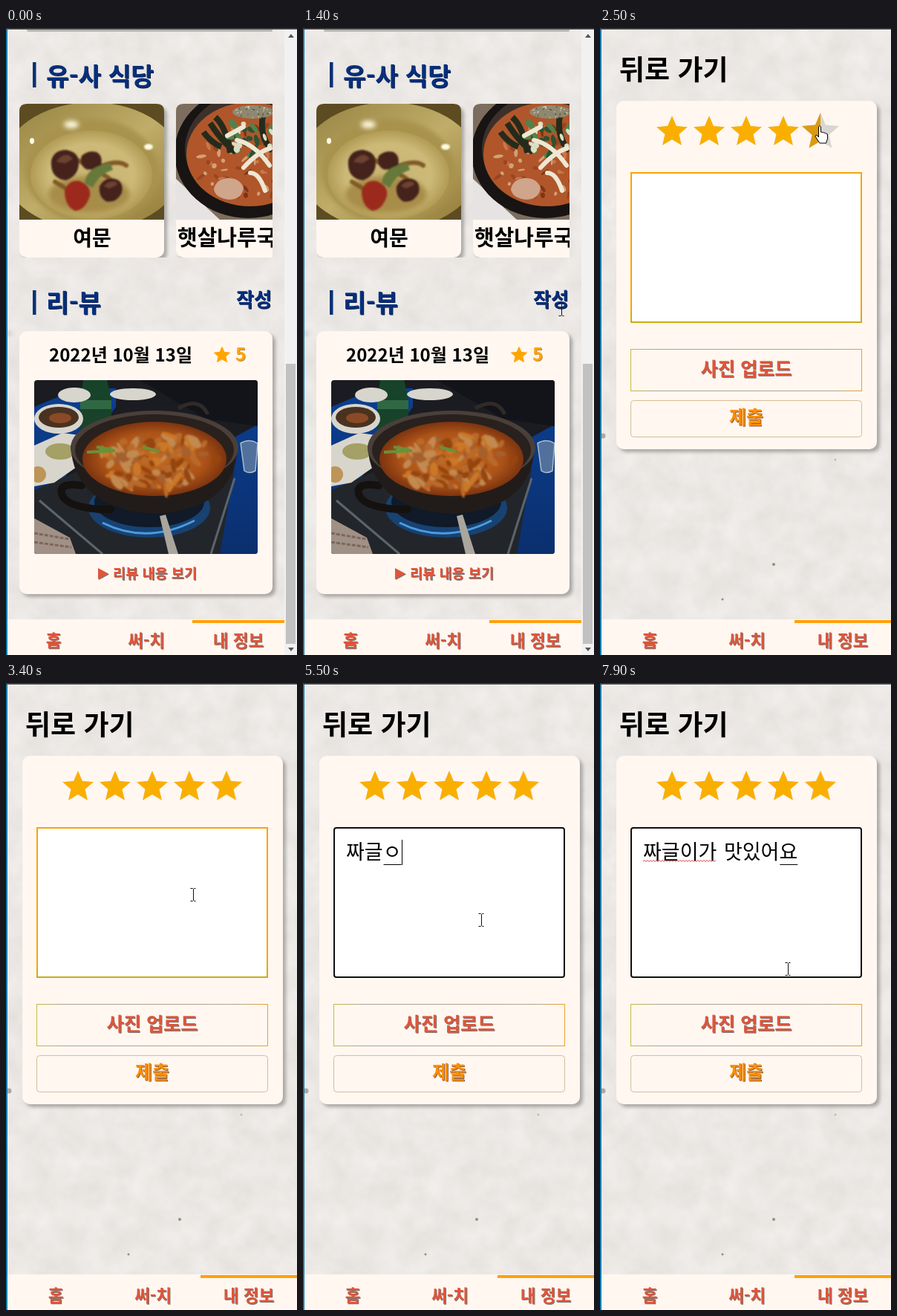
Animation, 392 px wide and 844 px high, one loop 8 s. Source, as an HTML page:

```html
<!DOCTYPE html>
<html lang="ko">
<head>
<meta charset="utf-8">
<title>리뷰 작성</title>
<style>
html, body { margin: 0; width: 100%; height: 100%; overflow: hidden; background: #e9e6e3; }
svg { display: block; }
text { font-family: "Noto Sans CJK KR", "Noto Sans CJK", "Noto Sans KR", sans-serif; font-weight: 700; white-space: pre; }
.mid { text-anchor: middle; }
.heavy { font-weight: 900; }
.cream { fill: #fff7f0; }
.lift { filter: drop-shadow(4px 4px 2px #0004); }
.head { font-size: 33.5px; font-weight: 900; fill: #062f7c; filter: drop-shadow(1px 1px 0 #0a1f4c); }
.red { fill: #e0553a; filter: drop-shadow(1px 1px 0 #777); }
.orange { fill: #ff9000; filter: drop-shadow(1px 1px 0 #8a5a48); }
.nav { font-size: 22.5px; text-anchor: middle; }
.gold { fill: #faaf00; }

/* 100 ms is 1.25% of the loop */
.first, .second, .arrow, .beam, .hand, .cursor, .focus, .four, .fifth, .half, .full {
  animation: 8s step-end infinite;
}
.first { animation-name: first; }
.second { animation-name: second; }
.cursor { animation-name: move; }
.arrow { animation-name: arrow; }
.beam { animation-name: beam; }
.hand { animation-name: hand; }
.focus { animation-name: focus; }
.four, .half { animation-name: four; }
.half { animation-name: half; }
.full { animation-name: full; }
.fifth { animation-name: hover; transform-origin: 297px 139px; }
@keyframes first { 0% { opacity: 1 } 18.75% { opacity: 0 } }
@keyframes second { 0% { opacity: 0 } 18.75% { opacity: 1 } }
@keyframes focus { 0% { opacity: 0 } 45% { opacity: 1 } }
@keyframes four { 0% { opacity: 0 } 27.5% { opacity: 1 } }
@keyframes half { 0% { opacity: 0 } 27.5% { opacity: 1 } 33.75% { opacity: 0 } }
@keyframes full { 0% { opacity: 0 } 33.75% { opacity: 1 } }
@keyframes hover { 0% { transform: scale(1) } 27.5% { transform: scale(1.2) } 37.5% { transform: scale(1) } }
@keyframes arrow { 0% { opacity: 0 } 3.75% { opacity: 1 } 8.75% { opacity: 0 } }
@keyframes beam { 0% { opacity: 0 } 8.75% { opacity: 1 } 27.5% { opacity: 0 } 41.25% { opacity: 1 } }
@keyframes hand { 0% { opacity: 0 } 27.5% { opacity: 1 } 41.25% { opacity: 0 } }
@keyframes move {
  0% { transform: translate(235px, 640px) }
  5% { transform: translate(290px, 540px) }
  6.25% { transform: translate(335px, 450px) }
  7.5% { transform: translate(356px, 390px) }
  8.75% { transform: translate(348px, 379px) }
  23.75% { transform: translate(307px, 340px) }
  26.25% { transform: translate(298px, 220px) }
  27.5% { transform: translate(297px, 146px) }
  30% { transform: translate(296px, 133px) }
  33.75% { transform: translate(302px, 133px) }
  38.75% { transform: translate(296px, 146px) }
  41.25% { transform: translate(272px, 230px) }
  42.5% { transform: translate(252px, 285px) }
  43.75% { transform: translate(238px, 315px) }
  48.75% { transform: translate(240px, 319px) }
  96.25% { transform: translate(243px, 335px) }
  97.5% { transform: translate(249px, 365px) }
  98.75% { transform: translate(253px, 385px) }
}
</style>
</head>
<body>
<svg width="392" height="844" viewBox="0 0 392 844">
  <defs>
    <filter id="paper" x="0" y="0" width="1" height="1" color-interpolation-filters="sRGB">
      <feTurbulence type="fractalNoise" baseFrequency=".03" numOctaves="5" seed="7"/>
      <feColorMatrix values=".07 0 0 0 .885  .072 0 0 0 .872  .075 0 0 0 .858  0 0 0 0 1"/>
    </filter>
    <filter id="soft" x="-1" y="-1" width="3" height="3"><feGaussianBlur stdDeviation="3"/></filter>
    <filter id="blend"><feGaussianBlur stdDeviation="1"/></filter>
    <path id="star" d="M12 17.27 18.18 21l-1.64-7.03L22 9.24l-7.19-.61L12 2 9.19 8.63 2 9.24l5.46 4.73L5.82 21z"/>
    <path id="halfStar" d="M12 2 9.19 8.63 2 9.24l5.46 4.73L5.82 21 12 17.27z"/>
    <clipPath id="row"><rect x="18" y="90" width="341" height="219"/></clipPath>
    <clipPath id="dish"><path d="M18 258V112q0-10 10-10H203q10 0 10 10V258z"/></clipPath>
    <clipPath id="bowl"><path d="M229 258V112q0-10 10-10H359V258z"/></clipPath>
    <clipPath id="photo"><rect x="38" y="474" width="301" height="234" rx="4"/></clipPath>
    <linearGradient id="plate" x2="1" y2="1">
      <stop stop-color="#93803f"/><stop offset=".5" stop-color="#c0ad69"/><stop offset="1" stop-color="#8d7433"/>
    </linearGradient>
    <radialGradient id="well">
      <stop stop-color="#c9b473"/><stop offset=".7" stop-color="#cdba78"/><stop offset="1" stop-color="#b19b55"/>
    </radialGradient>
    <radialGradient id="soup">
      <stop stop-color="#c26b24"/><stop offset=".7" stop-color="#ad5318"/><stop offset="1" stop-color="#7d340f"/>
    </radialGradient>
    <linearGradient id="cloth" x2="0" y2="1">
      <stop stop-color="#0b3f91"/><stop offset="1" stop-color="#0b2f6e"/>
    </linearGradient>
    <linearGradient id="edge" x2="1">
      <stop stop-color="#c8b83c"/><stop offset=".12" stop-color="#a9a49b"/>
      <stop offset=".88" stop-color="#b3a48d"/><stop offset="1" stop-color="#eda02a"/>
    </linearGradient>
    <linearGradient id="field" x2="0" y2="1">
      <stop offset=".9" stop-color="#f5a50c"/><stop offset="1" stop-color="#c9ad16"/>
    </linearGradient>
  </defs>

  <rect width="392" height="844" filter="url(#paper)"/>

  <g class="first">
    <circle cx="4" cy="411" r="3" fill="#b9afa6" filter="url(#soft)"/>
    <rect x="28" y="1" width="331" height="4" rx="2" fill="#b9b6b3"/>
    <path d="M36 46h4.500v34h-4.500zM36 353h4.500v33h-4.500z" fill="#0b3177"/>
    <text class="head" x="54" y="77">유-사 식당</text>
    <text class="head" x="54" y="382">리-뷰</text>
    <text class="head" x="310" y="375" style="font-size:26px">작성</text>

    <g clip-path="url(#row)">
      <rect class="cream lift" x="18" y="102" width="195" height="207" rx="10"/>
      <rect class="cream lift" x="229" y="102" width="195" height="207" rx="10"/>
      <text class="mid heavy" x="116" y="293" font-size="28">여문</text>
      <text class="heavy" x="231" y="293" font-size="29">햇살나루국밥</text>
    </g>

    <g clip-path="url(#dish)">
      <rect x="18" y="102" width="195" height="156" fill="#5d4c22"/>
      <ellipse cx="116" cy="186" rx="122" ry="86" fill="url(#plate)"/>
      <ellipse cx="115" cy="192" rx="90" ry="70" fill="#a8934e" filter="url(#soft)"/>
      <ellipse cx="115" cy="198" rx="82" ry="60" fill="url(#well)"/>
      <ellipse cx="112" cy="224" rx="55" ry="25" fill="#a88d48" filter="url(#soft)"/>
      <g fill="#fffbe2"><ellipse cx="88" cy="130" rx="10" ry="5" filter="url(#soft)"/><ellipse cx="192" cy="160" rx="6" ry="4" filter="url(#blend)"/><ellipse cx="35" cy="152" rx="3" ry="4"/></g>
      <g filter="url(#blend)">
        <g fill="none" stroke="#805a28" stroke-width="6" stroke-linecap="round"><path d="M84 174q20 5 26 14M128 186q23-9 34-1M124 195q20 6 22 20M66 207l18 11"/></g>
        <g fill="#44241a"><path d="M61 178q4-14 20-14 17 3 17 17 0 18-17 24-22-2-20-27zM102 172q9-8 20-5 9 5 6 18-8 9-22 4-8-7-4-17zM126 213q7-13 20-10 13 3 10 19-8 15-22 11-10-7-8-20z"/></g>
        <path d="M68 180q6-10 16-9l6 5-10 6zM132 213q6-8 16-6l2 4-11 5z" fill="#6d4230"/>
        <path d="M79 219q5-15 20-13 16 6 14 20-6 19-20 20-14-6-14-27z" fill="#9b2a1c"/>
        <path d="M106 209q2-23 35-27l3 9q-19 6-27 24z" fill="#66793a"/>
      </g>
    </g>

    <g clip-path="url(#bowl)">
      <rect x="229" y="102" width="130" height="156" fill="#7d6d5e"/>
      <path d="M229 203L288 258H229z" fill="#e6e3e2"/>
      <ellipse cx="326" cy="168" rx="99" ry="88" fill="#171413"/>
      <ellipse cx="329" cy="163" rx="88" ry="76" fill="#3d302a"/>
      <ellipse cx="329" cy="170" rx="86" ry="70" fill="#b0562a"/>
      <g id="stew"></g>
      <path d="M275 128q18 28 35 39M282 120q15 14 20 48M346 118q-5 30 13 47M266 140q10 14 24 20" stroke="#252b1c" stroke-width="8" fill="none"/>
      <g id="greens"></g>
      <path d="M311 151q24 5 44 34M320 188q20-22 36-26M329 195q12 0 20 24M298 145l22-12" stroke="#eee7d3" stroke-width="6" fill="none" stroke-linecap="round"/>
      <path d="M280 217q3-14 19-15 16 0 21 13-2 16-20 16-18-2-20-14z" fill="#cfa58b"/>
      <ellipse cx="333" cy="113" rx="28" ry="9" fill="#8f8871"/>
      <g id="sesame"></g>
    </g>

    <rect class="cream lift" x="18" y="408" width="341" height="354" rx="10"/>
    <text x="58" y="449" font-size="24">2022년 10월 13일</text>
    <use href="#star" x="279" y="428" fill="#ffa500" stroke="#ffa500" stroke-width="1.6" stroke-linejoin="round"/>
    <text x="309" y="448" font-size="24" fill="#ffa500" style="filter:drop-shadow(1px 1px 0 #b98a50)">5</text>

    <g clip-path="url(#photo)">
      <rect x="38" y="474" width="301" height="234" fill="#1b1c21"/>
      <path d="M38 510l60-25 50 0v25L75 610l-37 20zM300 555l39-21v174h-60z" fill="url(#cloth)"/>
      <path d="M180 474h159v62l-70-10z" fill="#131419"/>
      <path d="M38 622l70-30 200 0-20 116H38z" fill="#22262b"/>
      <path d="M45 636l85 72M276 708l32-102" stroke="#5c646b" stroke-width="3"/>
      <path d="M38 660l48 26 8 22H38z" fill="#a09186"/>
      <path d="M38 680l47 8M38 692l50 7" stroke="#80645a" stroke-width="3" stroke-dasharray="5 2"/>
      <path d="M104 474h32l6 25v42h-42v-42z" fill="#17432a"/>
      <path d="M100 501h42v12h-42z" fill="#2f6843"/>
      <g fill="#d8d5cd"><ellipse cx="92" cy="494" rx="22" ry="10"/><ellipse cx="171" cy="493" rx="31" ry="8"/><ellipse cx="71" cy="526" rx="33" ry="20"/><path d="M38 562l38-17 22 3 7 36-40 28-27 5z"/></g>
      <ellipse cx="71" cy="524" rx="27" ry="14" fill="#493220"/>
      <ellipse cx="73" cy="525" rx="15" ry="7" fill="#8a4a25"/>
      <ellipse cx="73" cy="570" rx="20" ry="11" fill="#a4a066"/>
      <ellipse cx="43" cy="601" rx="11" ry="11" fill="#bd9558"/>
      <path d="M316 559q11-7 23 0l-3 37q-8 5-15 0z" fill="#51719c" stroke="#a9bdd0" stroke-width="1.5"/>
      <ellipse cx="193" cy="646" rx="82" ry="40" fill="#174272"/>
      <ellipse cx="193" cy="638" rx="74" ry="34" fill="#101a28"/>
      <path d="M130 666q60 30 124-3" stroke="#4c9be0" stroke-width="3" fill="none"/>
      <path d="M207 657l8-2 17 53h-13z" fill="#aaa69d"/>
      <path d="M102 616q-31-5-27 11 4 17 52 21l14 0" stroke="#14110f" stroke-width="10" fill="none" stroke-linecap="round"/>
      <path d="M232 512q28-16 40 8" stroke="#302a28" stroke-width="5" fill="none"/>
      <path d="M87 562q5 85 112 92 110-5 113-92z" fill="#211c1a"/>
      <ellipse cx="200" cy="565" rx="113" ry="50" fill="#4a3f39"/>
      <ellipse cx="200" cy="568" rx="107" ry="48" fill="#29211d"/>
      <ellipse cx="200" cy="580" rx="97" ry="50" fill="url(#soup)"/>
      <g id="stewBig" filter="url(#blend)"></g>
      <path d="M109 571l38-2M184 564l22 6M122 564l22 4" stroke="#69913a" stroke-width="4"/>
    </g>
    <path class="red" d="M124 727l14 7.5-14 7.5z"/>
    <text class="red" x="144" y="741" font-size="18.6">리뷰 내용 보기</text>

    <rect class="cream" x="2" y="796" width="373" height="48"/>
    <rect x="251" y="797" width="124" height="4" fill="#ffa10a"/>
    <text class="nav red" x="64" y="833">홈</text>
    <text class="nav red" x="189" y="833">써-치</text>
    <text class="nav red" x="313" y="833">내 정보</text>
    <rect x="375" width="17" height="844" fill="#f1f1f1"/>
    <rect x="377" y="452" width="13" height="377" fill="#c1c1c1"/>
    <path d="M380 13l4-5 4 5zM380 834l4 5 4-5z" fill="#555"/>
  </g>

  <g class="second">
    <g fill="#978c82"><circle cx="4" cy="549" r="3.5" opacity=".7"/><circle cx="234" cy="722" r="2"/><circle cx="165" cy="769" r="1.5"/><circle cx="317" cy="581" r="1.5" opacity=".5"/></g>
    <text class="heavy" x="26" y="70" font-size="37">뒤로 가기</text>
    <rect class="cream lift" x="22" y="98" width="351" height="469" rx="10"/>
    <g id="emptyStars" fill="#d8d5d2"></g>
    <g id="goldStars" class="four gold"></g>
    <g class="fifth">
      <g transform="translate(272 114) scale(2.083)">
        <use href="#star" fill="#d8d5d2"/>
        <use class="half" href="#halfStar" fill="#dc9a10"/>
        <use class="full gold" href="#star"/>
      </g>
    </g>
    <rect x="42" y="195" width="310" height="201" fill="#fff" stroke="url(#field)" stroke-width="2"/>
    <g class="focus">
      <rect x="41" y="194" width="312" height="203" fill="#fff7f0"/>
      <rect x="42" y="195" width="310" height="201" rx="3" fill="#fff" stroke="#101010" stroke-width="2"/>
    </g>
    <path id="squiggle" fill="none" stroke="#d33" stroke-width="1"/>
    <text id="typed" x="58" y="237" style="font-size:27px;font-weight:500;word-spacing:2px"></text>
    <rect id="underline" y="244" height="1"/>
    <rect id="caret" y="211" width="1" height="34"/>
    <rect x="41.5" y="432.5" width="311" height="56" fill="none" stroke="url(#edge)"/>
    <text class="mid red" x="197" y="468" font-size="25.2">사진 업로드</text>
    <rect x="41.5" y="501.5" width="311" height="49" rx="4" fill="none" stroke="#d6bd9a"/>
    <text class="mid orange" x="197" y="533" font-size="25">제출</text>
    <rect class="cream" x="2" y="796" width="390" height="48"/>
    <rect x="262" y="797" width="130" height="4" fill="#ffa10a"/>
    <text class="nav red" x="67" y="833">홈</text>
    <text class="nav red" x="198" y="833">써-치</text>
    <text class="nav red" x="327" y="833">내 정보</text>
  </g>

  <rect width="2" height="844" fill="#1680b3"/>
  <rect width="392" height="2" fill="#414144"/>

  <g class="cursor">
    <path class="arrow" d="M0 0v16l4-4 3 7 2-1-3-7h6z" fill="#fff" stroke="#000"/>
    <path class="beam" d="M-3.5-8.5h3l1 1 1-1h2M.5-7.5v15M-3.5 8.5h3l1-1 1 1h2" fill="none" stroke="#111"/>
    <path class="hand" d="M-1.5 0q1.5-3 3 0v7l3 .5 3 1 3 1.5v6l-2 6H0l-6-9q0-3 3-1l1.500 2z" fill="#fff" stroke="#000" stroke-linejoin="round"/>
  </g>
</svg>
<script>
const $ = id => document.getElementById(id);
const NS = 'http://www.w3.org/2000/svg';

function add(parent, tag, attrs) {
  const el = document.createElementNS(NS, tag);
  for (const key in attrs) el.setAttribute(key, attrs[key]);
  parent.append(el);
}

let seed = 11;
const random = () => (seed = seed * 16807 % 2147483647) / 2147483647;

// Scatters small pieces of food inside an ellipse.
function scatter(id, count, cx, cy, rx, ry, size, colors) {
  for (let i = 0; i < count; i++) {
    const angle = random() * 2 * Math.PI, reach = Math.sqrt(random());
    const x = cx + rx * reach * Math.cos(angle), y = cy + ry * reach * Math.sin(angle);
    add($(id), 'ellipse', {
      rx: size * (.4 + random()), ry: size * (.25 + random() * .4),
      fill: colors[i % colors.length],
      transform: `translate(${x} ${y}) rotate(${random() * 180})`
    });
  }
}
scatter('stew', 80, 328, 180, 74, 52, 5, ['#c9784a', '#9a4422', '#d3a077', '#7d3419']);
scatter('greens', 24, 328, 145, 32, 28, 7, ['#55804a', '#d9e0c4', '#2f5130']);
scatter('sesame', 30, 334, 113, 26, 8, 1.5, ['#e3d9bb', '#5b5340']);
scatter('stewBig', 110, 202, 583, 82, 38, 9, ['#b96b2a', '#96440f', '#c28a50', '#a4602f', '#cb7828']);

for (let i = 0; i < 4; i++) {
  const transform = `translate(${72 + 50 * i} 114) scale(2.083)`;
  for (const row of ['emptyStars', 'goldStars']) add($(row), 'use', { href: '#star', transform });
}

let wave = 'M58 240';
for (let x = 60, up = true; x <= 157; x += 2, up = !up) wave += `L${x} ${up ? 238.5 : 240.5}`;
$('squiggle').setAttribute('d', wave);

const LOOP = 8000, LEFT = 58;
const typing = [
  [0, ''], [4500, 'ㅉ'], [5100, '짜'], [5200, '짝'], [5300, '짜그'], [5400, '짜글'],
  [5500, '짜글ㅇ'], [5600, '짜글이'], [5700, '짜글익'], [5800, '짜글이가'], [5900, '짜글이가 '],
  [6100, '짜글이가 마'], [6200, '짜글이가 맛'], [6300, '짜글이가 맛ㅇ'], [6400, '짜글이가 맛이'],
  [6500, '짜글이가 맛있'], [6600, '짜글이가 맛있ㅇ'], [6700, '짜글이가 맛있어'],
  [6800, '짜글이가 맛있엉'], [6900, '짜글이가 맛있어요']
];

function draw(now) {
  const clock = document.timeline.currentTime ?? now;
  const start = document.getAnimations()[0]?.startTime ?? 0;
  const t = Math.max(0, clock - start) % LOOP;
  const text = typing.findLast(([from]) => t >= from)[1];
  if ($('typed').textContent !== text) $('typed').textContent = text;
  const end = text ? LEFT + $('typed').getComputedTextLength() : LEFT;
  const composing = text && !text.endsWith(' ');
  $('underline').setAttribute('x', end - 24);
  $('underline').setAttribute('width', composing ? 24 : 0);
  $('caret').setAttribute('x', Math.round(end));
  $('caret').style.opacity = +(t >= 3600 && t < 4100 || t >= 4500 && t < 7500);
  $('squiggle').style.opacity = +(t >= 5900);
  requestAnimationFrame(draw);
}
requestAnimationFrame(draw);
</script>
</body>
</html>
```
